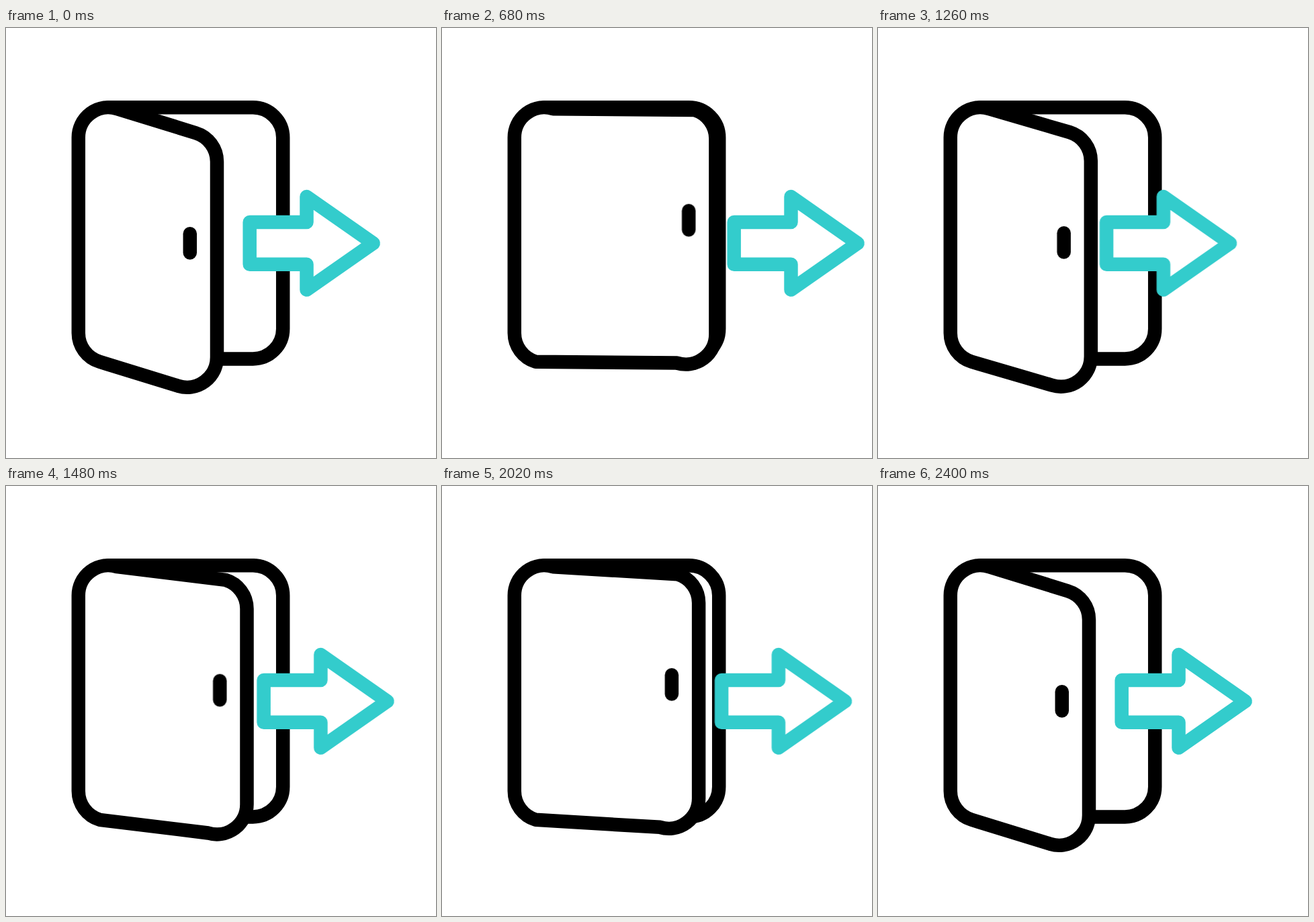
Animation, 640 px wide and 640 px high, one loop 2820 ms. Source, as an HTML page without scripts:

```html
<!DOCTYPE html>
<html lang="en">
<head>
<meta charset="utf-8">
<title>Exit door</title>
<style>
  html, body { margin: 0; width: 100%; height: 100%; overflow: hidden; background: #fff; }
  svg { display: block; width: 100%; height: 100%; }
  path { fill: #fff; stroke: #000; stroke-width: 20.5; stroke-linecap: round; stroke-linejoin: round; }
  .frame { fill: none; }
  .arrow { stroke: #3cc; }

  /* Two swings of 1200 ms, then a 420 ms rest */
  .door, .handle, .arrow { animation: 2820ms cubic-bezier(.3333, 0, .6667, 1) infinite; }
  .door { animation-name: swing; }
  .handle { animation-name: follow; }
  .arrow { animation-name: push; }

  /* Only the free edge of the door moves; the hinge side stays put */
  @keyframes swing {
    0%, 42.5532%, 85.1064%, 100% {
      d: path("M314 490v-291a44.7 44.7 0 0 0 -31.7 -42.8L165.5 120.2A44.7 44.7 0 0 0 107.8 163V454A44.7 44.7 0 0 0 139.5 496.8L256.3 532.8a44.7 44.7 0 0 0 57.7 -42.8z");
    }
    21.2766%, 63.8298% {
      d: path("M412.3 454v-291a44.7 44.7 0 0 0 -31.7 -42.8L165.5 120.2A44.7 44.7 0 0 0 107.8 163V454A44.7 44.7 0 0 0 139.5 496.8L354.6 496.8a44.7 44.7 0 0 0 57.7 -42.8z");
    }
  }
  @keyframes follow {
    0%, 42.5532%, 85.1064%, 100% { transform: translate(0, 0); }
    21.2766%, 63.8298% { transform: translate(98.3px, -36px); }
  }
  @keyframes push {
    0%, 85.1064%, 100% { transform: translateX(0); }
    21.2766%, 63.8298% { transform: translateX(77px); }
    42.5532% { transform: translateX(-25.6px); }
  }
</style>
</head>
<body>
<svg viewBox="0 0 640 640">
  <path class="frame" d="M152.5 118.3H367.5a44.7 44.7 0 0 1 44.7 44.7V447.7a44.7 44.7 0 0 1 -44.7 44.7H300"/>
  <path class="door" d="M314 490v-291a44.7 44.7 0 0 0 -31.7 -42.8L165.5 120.2A44.7 44.7 0 0 0 107.8 163V454A44.7 44.7 0 0 0 139.5 496.8L256.3 532.8a44.7 44.7 0 0 0 57.7 -42.8z"/>
  <path class="handle" d="M273.8 306.2V334.5"/>
  <path class="arrow" d="M362.7 289H447.5V251.1L546.6 320.4L447.5 389.6V351.7H362.7z"/>
</svg>
</body>
</html>
```
